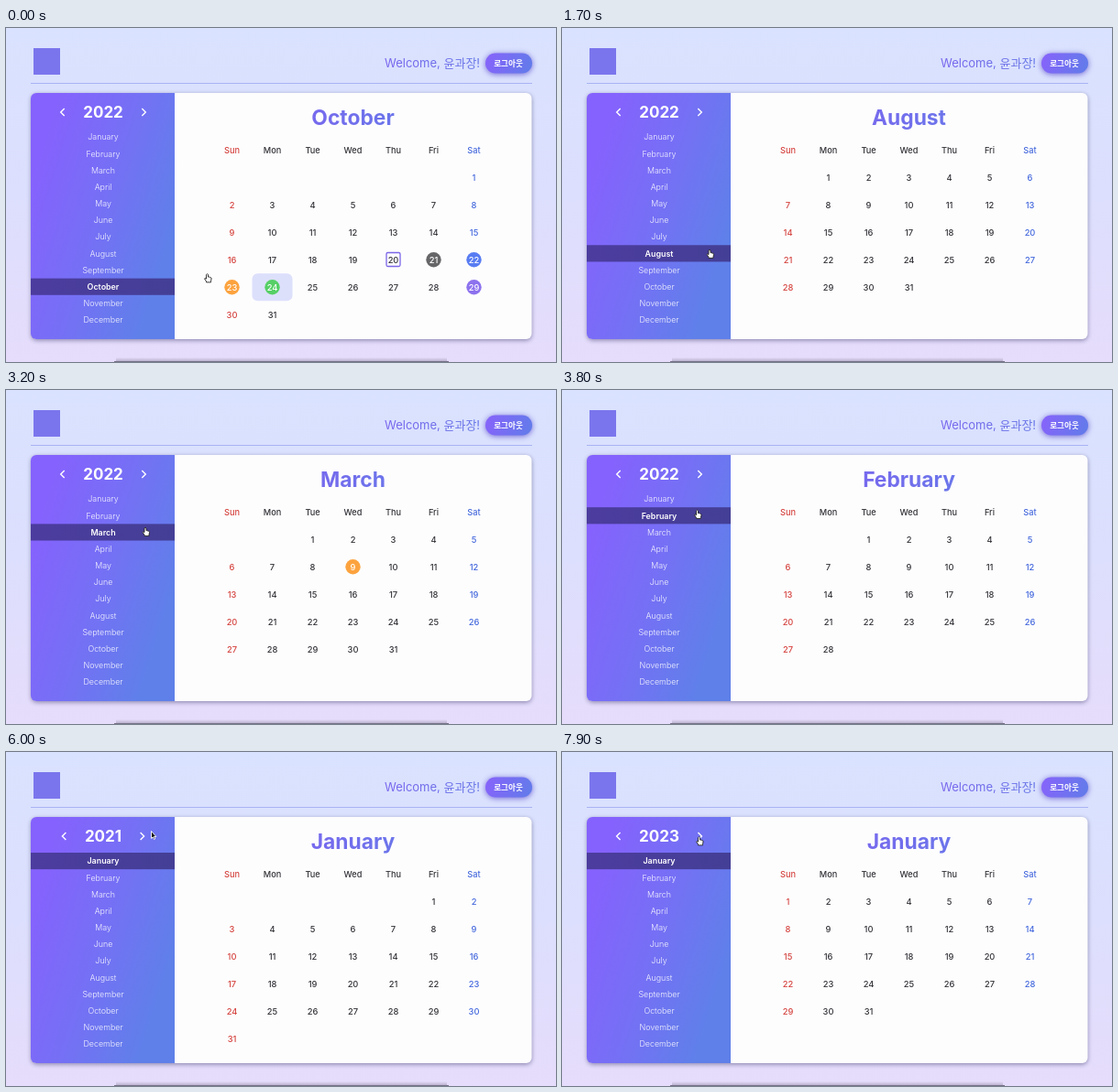
Recreate the animation shown at these times as an HTML page with a canvas. Size 600 px wide and 365 px high, loop 8 s.

```html
<!DOCTYPE html>
<html lang="ko">
<head>
<meta charset="utf-8">
<title>Calendar</title>
<style>
html, body { margin: 0; width: 100%; height: 100%; overflow: hidden; }
canvas { display: block; width: 600px; height: 365px; }
</style>
</head>
<body>
<canvas id="stage"></canvas>
<script>
const LOOP = 8000;
const MONTHS = ['January', 'February', 'March', 'April', 'May', 'June', 'July',
  'August', 'September', 'October', 'November', 'December'];
const DAYS = ['Sun', 'Mon', 'Tue', 'Wed', 'Thu', 'Fri', 'Sat'];
const FONT = 'Inter, "Noto Sans CJK KR", "Noto Sans CJK", sans-serif';
const RED = '#d5443f', BLUE = '#4468dc', INK = '#333338';
const ORANGE = '#fca33f', GREY = '#666668', VIOLET = '#8d72ee';
const ROW = 18.18, LIST_TOP = 110;

// event dots by month of 2022
const MARKS = {
  1: { 1: '#f78bb0' },
  3: { 9: ORANGE },
  7: { 13: VIOLET, 24: GREY },
  9: { 15: ORANGE, 19: '#655553' },
  10: { 21: GREY, 22: '#587cf2', 23: ORANGE, 24: '#56d066', 29: VIOLET }
};

// time, year, month
const VIEWS = [[0, 2022, 10], [900, 2022, 9], [1500, 2022, 8], [2000, 2022, 7],
  [2400, 2022, 6], [2650, 2022, 5], [2880, 2022, 4], [3100, 2022, 3],
  [3600, 2022, 2], [4050, 2022, 1], [5000, 2021, 1], [6700, 2022, 1], [7300, 2023, 1]];

// time, pointer x, pointer y
const PATH = [[0, 219.5, 268.5], [200, 219.5, 268.5], [600, 163, 261], [1100, 163, 261],
  [1400, 161, 242], [1700, 161, 242], [1950, 157, 223], [2150, 157, 223],
  [2300, 154.5, 202], [2400, 154.5, 202], [2600, 153, 187], [2850, 152, 168],
  [3050, 152, 150], [3300, 152, 150], [3550, 148, 133], [3750, 148, 133],
  [4000, 143, 115], [4200, 143, 115], [4600, 61.5, 93], [5300, 61.5, 93],
  [5900, 158.5, 86.5], [6050, 158.5, 86.5], [6400, 149.5, 92.5], [8000, 149.5, 92.5]];

const canvas = document.getElementById('stage');
const dpr = window.devicePixelRatio || 1;
canvas.width = 600 * dpr;
canvas.height = 365 * dpr;
const ctx = canvas.getContext('2d');
ctx.scale(dpr, dpr);

function gradient(x0, y0, x1, y1, ...stops) {
  const g = ctx.createLinearGradient(x0, y0, x1, y1);
  stops.forEach((c, i) => g.addColorStop(i / (stops.length - 1), c));
  return g;
}

function box(x, y, w, h, r, fill) {
  ctx.beginPath();
  ctx.roundRect(x, y, w, h, r);
  ctx.fillStyle = fill;
  ctx.fill();
}

function glow(color, blur, dy) {
  ctx.shadowColor = color;
  ctx.shadowBlur = blur * dpr;
  ctx.shadowOffsetY = dy * dpr;
}

// cy is the middle of the capitals
function text(s, x, cy, size, weight, fill, align = 'center') {
  ctx.font = `${weight} ${size}px ${FONT}`;
  ctx.textAlign = align;
  ctx.fillStyle = fill;
  ctx.fillText(s, x, cy + size * 0.364);
}

function chevron(x, dir) {
  ctx.beginPath();
  ctx.moveTo(x - dir * 2, 88);
  ctx.lineTo(x + dir * 2, 92);
  ctx.lineTo(x - dir * 2, 96);
  ctx.strokeStyle = '#fff';
  ctx.lineWidth = 1.4;
  ctx.stroke();
}

function pointerAt(t) {
  const i = Math.max(1, PATH.findIndex(p => p[0] > t));
  const [t0, x0, y0] = PATH[i - 1], [t1, x1, y1] = PATH[i];
  const u = (t - t0) / (t1 - t0), e = u * u * (3 - 2 * u);
  return [x0 + (x1 - x0) * e, y0 + (y1 - y0) * e];
}

function drawHeader() {
  ctx.fillStyle = gradient(0, 0, 0, 365, '#d9e2fe', '#dcdffd', '#e6dcfb');
  ctx.fillRect(0, 0, 600, 365);
  box(30, 22, 29, 29, 0, '#7b75ed');
  text('Welcome, 윤과장!', 413, 38.5, 13, 400,
    gradient(413, 0, 514, 0, '#7a66ee', '#6876e6'), 'left');
  glow('rgba(80, 60, 200, .75)', 6, 1);
  box(523, 27.5, 51, 22, 11, gradient(523, 30, 574, 48, '#8763fb', '#617ce9'));
  glow('transparent', 0, 0);
  text('로그아웃', 548, 38.5, 8.6, 700, '#fff');
  ctx.fillStyle = '#a9b3f3';
  ctx.fillRect(27, 60, 547, 1);

  // shadow of the dock below the page
  ctx.fillStyle = gradient(0, 360, 0, 365, 'rgba(80,75,100,0)', 'rgba(80,75,100,.35)');
  ctx.fillRect(120, 360, 361, 5);
  ctx.fillStyle = '#77738a';
  ctx.fillRect(118, 364, 365, 1);
}

function drawSidebar(year, month, hover) {
  box(27, 71, 157, 269, [6, 0, 0, 6],
    gradient(27, 170, 184, 220, '#8562fd', '#7570f5', '#5f80e9'));
  ctx.font = `700 17px ${FONT}`;
  const half = ctx.measureText(year).width / 2;
  text(year, 106, 92, 17, 700, '#fff');
  chevron(106 - half - 22.5, -1);
  chevron(106 + half + 22.5, 1);

  MONTHS.forEach((name, i) => {
    const y = LIST_TOP + i * ROW, on = i === month - 1;
    if (on || i === hover) {
      ctx.fillStyle = on ? gradient(27, 0, 184, 0, '#4c3c9e', '#443f96') : '#6a5efd';
      ctx.fillRect(27, y, 157, ROW);
    }
    text(name, 106, y + 9.1, 8.9, on ? 600 : 300, on ? '#fff' : 'rgba(255,255,255,.92)');
  });
}

function drawMonth(year, month, picked) {
  text(MONTHS[month - 1], 378.5, 98, 22.8, 700,
    gradient(318, 0, 439, 0, '#7868ee', '#6a77ea'));
  const tint = col => col === 0 ? RED : col === 6 ? BLUE : INK;
  const colX = col => 246.5 + col * 44;
  DAYS.forEach((d, i) => text(d, colX(i), 133.5, 9.2, 500, tint(i)));

  const first = new Date(year, month - 1, 1).getDay();
  const count = new Date(year, month, 0).getDate();
  const marks = year === 2022 && MARKS[month] || {};
  for (let d = 1; d <= count; d++) {
    const cell = first + d - 1, col = cell % 7;
    const x = colX(col), y = 163.2 + Math.floor(cell / 7) * 30;
    if (d === picked) box(x - 22, y - 15, 44, 30, 6, '#dde0fb');
    if (marks[d]) box(x - 8.2, y - 8.2, 16.4, 16.4, 8.2, marks[d]);
    if (year === 2022 && month === 10 && d === 20) {
      ctx.beginPath();
      ctx.roundRect(x - 7.5, y - 7.7, 15, 15, 1.5);
      ctx.strokeStyle = '#7c66e8';
      ctx.lineWidth = 1.3;
      ctx.stroke();
    }
    text(d, x, y, 9.3, 500, marks[d] ? '#fff' : tint(col));
  }
}

function drawPointer(x, y, hand) {
  const shape = hand
    ? 'M-1 1Q0-.6 1 1V3.6Q2 3 2.4 3.9Q3.4 3.4 3.6 4.4Q4.6 4.2 4.6 5.3L4 8.2V9.4H-1V8.4L-3 5.4Q-2.6 4.2-1 5.6Z'
    : 'M0 0V8L1.8 6.4L3 9L4.2 8.4L3.1 6H5.3Z';
  ctx.save();
  ctx.translate(x, y);
  const p = new Path2D(shape);
  ctx.lineJoin = 'round';
  ctx.lineWidth = 0.9;
  ctx.fillStyle = hand ? '#fff' : '#111';
  ctx.strokeStyle = hand ? '#222' : '#fff';
  ctx.fill(p);
  ctx.stroke(p);
  ctx.restore();
}

function draw(t) {
  const [, year, month] = VIEWS.filter(v => v[0] <= t).pop();
  const [x, y] = pointerAt(t);
  const inList = x < 184 && y >= LIST_TOP;
  const onArrow = Math.abs(y - 92) < 8 && (Math.abs(x - 62) < 8 || Math.abs(x - 149) < 8);

  drawHeader();
  glow('rgba(50, 45, 100, .5)', 5, 1.5);
  box(27.5, 71, 546, 269, 6, '#fdfdfe');
  glow('transparent', 0, 0);
  drawSidebar(year, month, inList ? Math.floor((y - LIST_TOP) / ROW) : -1);
  drawMonth(year, month, t < 100 ? 24 : 0);
  drawPointer(x, y, inList || onArrow || t < 300);
}

const start = performance.now();
function tick() {
  draw((performance.now() - start) % LOOP);
  requestAnimationFrame(tick);
}
tick();
</script>
</body>
</html>
```
